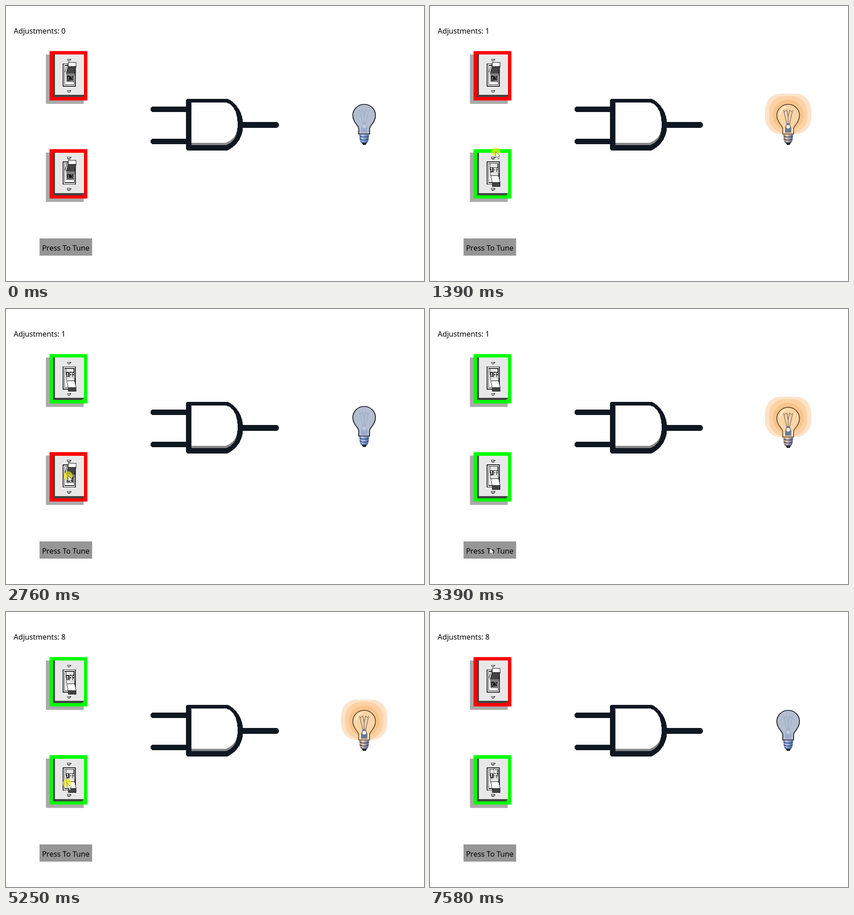
These frames come from a looping animation (922 by 607 pixels, 8 s). An HTML page:

```html
<!DOCTYPE html>
<html lang="en">
<head>
<meta charset="utf-8">
<title>Logic gate trainer</title>
<style>
  html, body { margin: 0; width: 100%; height: 100%; overflow: hidden; background: #fff; }
  svg { display: block; width: 100%; height: 100%; }
  text { font: 16.3px "Noto Sans", "Open Sans", sans-serif; }
  .hidden { display: none; }
  .pixel { shape-rendering: crispEdges; }
</style>
</head>
<body>
<svg viewBox="0 0 922 607">
  <defs>
    <linearGradient id="steel">
      <stop stop-color="#4968a4"/><stop offset=".3" stop-color="#b9cbee"/><stop offset="1" stop-color="#4164a8"/>
    </linearGradient>
    <linearGradient id="brass">
      <stop stop-color="#8d6b58"/><stop offset=".35" stop-color="#f4d2ac"/><stop offset="1" stop-color="#4a5f96"/>
    </linearGradient>

    <g id="screw" stroke="#333">
      <path d="M-4 -2H4.500Q3 3 0 3T-4 -2ZM-3 2L4 -1" fill="#fff"/>
    </g>
    <g id="plate">
      <path d="M104 107H172V196L168 201H104Z" fill="#444"/>
      <rect x="108" y="107" width="64" height="89" fill="#e8e8e8"/>
      <use href="#screw" x="139" y="119"/>
      <use href="#screw" x="139" y="188"/>
      <g fill="#fff" stroke="#222" stroke-width="1.500">
        <rect x="126" y="127.500" width="27" height="49.500"/>
        <rect x="129.500" y="131" width="21" height="42.500"/>
      </g>
    </g>
    <g id="lever-on" stroke="#111">
      <path d="M130 146L136 128"/>
      <path d="M137 133H154.500L151.500 148H133Z" fill="#444"/>
      <path d="M133 148H151.500L150 167H134Z" fill="#808080" stroke="#555" stroke-width=".7"/>
      <path d="M137 124H154.500V133H137Z" fill="#fff"/>
      <path d="M136 155H140L139.500 164H135.500ZM142 164.500L142.500 155L146 164L147 154.500" fill="none" stroke-width="1.800"/>
    </g>
    <g id="lever-off" stroke="#111">
      <path d="M132 131H149L151.500 158H134Z" fill="#e8e8e8" stroke-width=".9"/>
      <path d="M134 158H151.500L154.500 173H137Z" fill="#fff"/>
      <path d="M137 173H154.500V181.500H137Z" fill="#444"/>
      <path d="M133.500 140H138V149.500H134ZM140.500 150.500V140H144.500M140.500 145H144M146.500 150.500V140H150.500M146.500 145H150" fill="none" stroke-width="1.600"/>
    </g>

    <!-- Bulb parts are centred on the glass -->
    <path id="glass" d="M-12 41V29C-12 23 -25 15 -25 0A25 24.500 0 0 1 25 0C25 15 12 23 12 29V41Z"/>
    <path id="filament" d="M-10 -12L-3 19M10 -12L3 19M-8 -8L-3 -12L0 3L3 -12L8 -8M0 3V19" fill="none" stroke-width="1.500"/>
    <path id="stem" d="M-7 38V28L-3 17H3L7 28V38Z"/>
    <g id="base">
      <path d="M-11 42H11L9 57L5 62H-5L-9 57Z"/>
      <path d="M-9 46Q0 50 10 46M-10 52Q0 57 10 52M-8 58Q0 61 8 58" fill="none" stroke="#26406f" stroke-width="1.700"/>
      <path d="M-6 61H6L3 65H-2Z" fill="#0b0e14"/>
    </g>
  </defs>

  <rect width="922" height="607" fill="#fff"/>
  <text id="count" x="17" y="61"></text>
  <g id="switches"></g>

  <g id="gate" class="pixel">
    <path d="M325 228H400M325 299H400M518 262.500H596" stroke="#0f1722" stroke-width="12.600" stroke-linecap="round"/>
    <path d="M397 208L400 204.500H488C505 211 523 233 523 262C523 292 508 309 489 318.500H400L397 315Z" fill="#0f1722"/>
    <path d="M408.500 212.500H485C502 217 511 234 511 262C511 287 503 301 486 307H408.500Z" fill="#888"/>
    <path d="M408.500 212.500H485C502 217 511 234 511 262C511 284 502 295 485 302H408.500Z" fill="#fff"/>
  </g>

  <g id="dark-bulb">
    <use href="#glass" fill="#b3bed0" stroke="#080b10" stroke-width="1.700"/>
    <use href="#filament" stroke="#9daccb"/>
    <use href="#stem" fill="#9daccb"/>
    <circle cy="24" r="4" fill="#c0cbe0"/>
    <use href="#base" fill="url(#steel)"/>
  </g>

  <g id="lit-bulb" transform="translate(790 241.500)">
    <rect x="-51" y="-48" width="102" height="89" rx="33" ry="36" fill="#fde3c9"/>
    <rect x="-42" y="-43" width="84" height="82" rx="34" fill="#fcd2a5"/>
    <circle r="34" cy="-1" fill="#f9c48b"/>
    <use href="#glass" fill="#fcd5a6" stroke="#4c2f18" stroke-width="1.500"/>
    <path d="M-18 -2Q-17 -15 -5 -19M-9 29V38M9 29V38" fill="none" stroke="#ffecd0" stroke-width="3"/>
    <use href="#filament" stroke="#85766b"/>
    <use href="#stem" fill="#6b7896"/>
    <circle cy="25" r="4" fill="#fff1dc"/>
    <use href="#base" fill="url(#brass)"/>
  </g>

  <rect x="74" y="513" width="116" height="38" fill="#969696"/>
  <text x="79.500" y="540">Press To Tune</text>

  <g id="cursor">
    <circle id="press" r="10" fill="#f5ee00" opacity=".65"/>
    <path d="M0 0V13L3 10L5.500 15.500L8 14.500L5.500 9.500H9.500Z" fill="#fff" stroke="#555" stroke-width=".9"/>
  </g>
</svg>

<script>
const LOOP = 8000;
const FULLY_TUNED = 8;
const $ = id => document.getElementById(id);
const show = (node, visible) => node.classList.toggle('hidden', !visible);

// The cursor rests on a control and clicks it `clicks` times, `gap` ms apart.
const visit = (control, x, y, arrive, leave, first, clicks = 1, gap = 0) => ({
  control, x, y, arrive, leave,
  presses: Array.from({ length: clicks }, (_, i) => first + i * gap)
});
const visits = [
  visit('none', 128, 610, 0, 80, 0, 0),
  visit('tune', 132, 528, 330, 470, 410),
  visit('lower', 145, 322, 850, 1430, 910, 2, 510),
  visit('upper', 149, 182, 2060, 2460, 2080),
  visit('lower', 137, 368, 2740, 3120, 2770),
  visit('tune', 132, 528, 3380, 4260, 3480, 7, 120),
  visit('lower', 135, 378, 4640, 5710, 5290),
  visit('upper', 137, 182, 6330, 6600, 6510),
  visit('lower', 141, 345, 7090, LOOP, 7320)
];
const pressesOf = control => visits.filter(v => v.control === control).flatMap(v => v.presses);
const allPresses = visits.flatMap(v => v.presses);

const switches = ['upper', 'lower'].map((control, i) => {
  const group = document.createElementNS('http://www.w3.org/2000/svg', 'g');
  group.setAttribute('transform', `translate(0 ${i * 216.5})`);
  group.innerHTML = `
    <rect x="88" y="107" width="83.500" height="109" fill="#aaa"/>
    <rect class="edge" x="96" y="99.500" width="83.500" height="109"/>
    <g class="pixel">
      <use href="#plate"/>
      <use class="on" href="#lever-on"/>
      <use class="off" href="#lever-off"/>
    </g>
    <path class="rays" d="M128 99.500L131 107M157 99.500L153 107M172 121L179.500 118M172 140L179.500 145" stroke="#fff" stroke-width="3"/>`;
  $('switches').append(group);
  const [edge, on, off, rays] = ['edge', 'on', 'off', 'rays'].map(name => group.querySelector('.' + name));
  return { edge, on, off, rays, presses: pressesOf(control) };
});

function drawSwitch({ edge, on, off, rays, presses }, t) {
  const past = presses.filter(time => time <= t);
  const isOn = past.length % 2 === 0;
  edge.setAttribute('fill', isOn ? '#f00' : '#0f0');
  show(on, isOn);
  show(off, !isOn);
  show(rays, isOn && t - past.at(-1) < 50);
  return isOn;
}

function cursorAt(t) {
  const i = visits.findLastIndex(v => v.arrive <= t);
  const from = visits[i];
  const to = visits[i + 1] ?? from;
  const u = Math.max(0, (t - from.leave) / (to.arrive - from.leave));
  const ease = u * u * (3 - 2 * u);
  return [from.x + (to.x - from.x) * ease, from.y + (to.y - from.y) * ease];
}

function isLit(upper, lower, tuned) {
  if (tuned === 0) return false;
  return tuned < FULLY_TUNED ? upper || !lower : !upper && !lower;
}

function draw(t) {
  const tuned = pressesOf('tune').filter(time => time <= t).length;
  $('count').textContent = `Adjustments: ${tuned}`;

  const [upper, lower] = switches.map(part => drawSwitch(part, t));
  const lit = isLit(upper, lower, tuned);
  show($('lit-bulb'), lit);
  show($('dark-bulb'), !lit);
  // The dark bulb sits slightly higher when only the lower switch is on.
  $('dark-bulb').setAttribute('transform', `translate(790 ${!upper && lower ? 239.5 : 241.5})`);

  const [x, y] = cursorAt(t);
  $('cursor').setAttribute('transform', `translate(${Math.round(x)} ${Math.round(y)})`);
  show($('press'), allPresses.some(time => t >= time - 40 && t < time + 60));
}

const start = performance.now();
function tick() {
  draw((performance.now() - start) % LOOP);
  requestAnimationFrame(tick);
}
tick();
</script>
</body>
</html>
```
